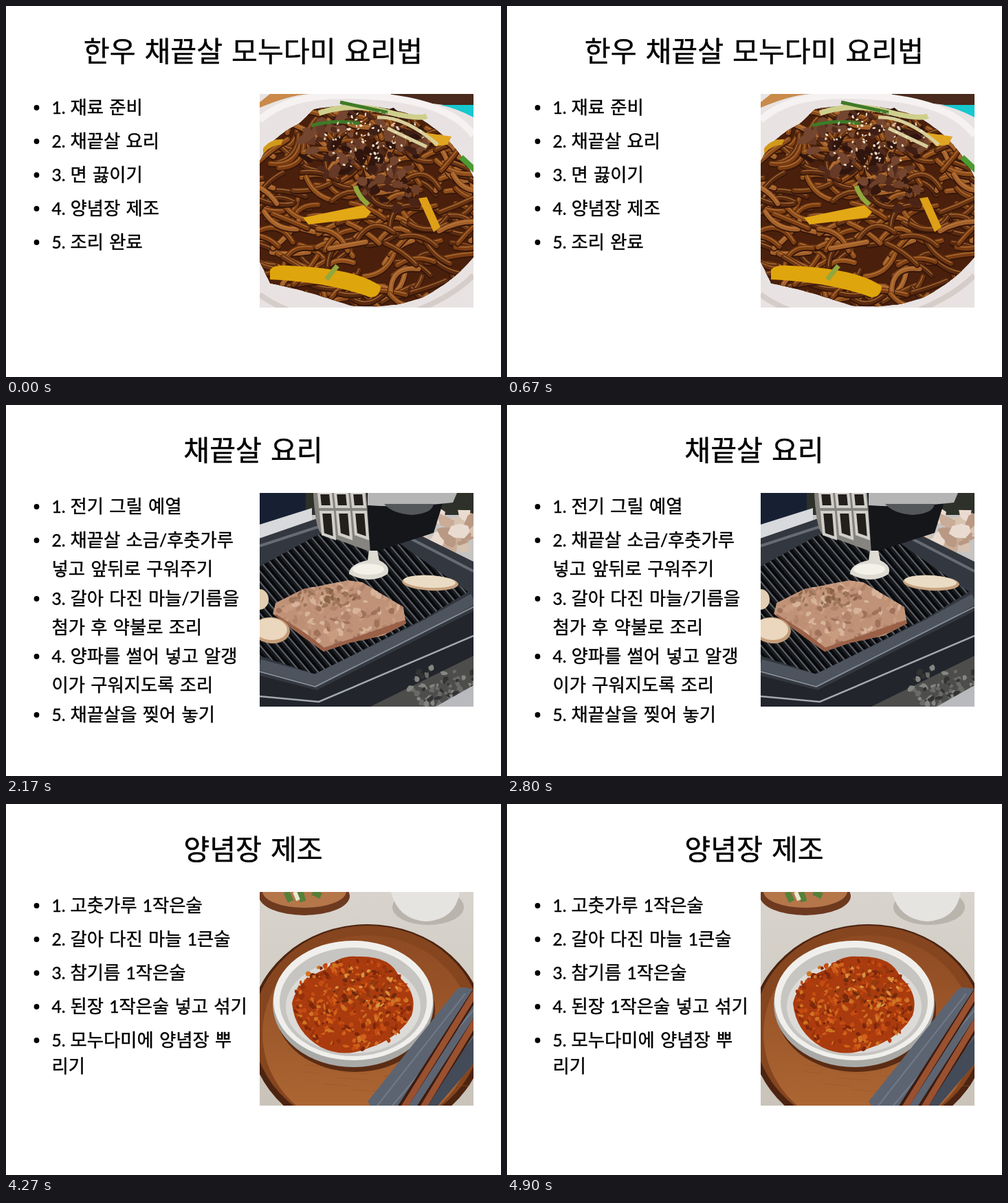
These frames come from a looping animation (720x540 px, 5320 ms). An HTML page:

```html
<!DOCTYPE html>
<html lang="ko">
<head>
<meta charset="utf-8">
<title>요리법</title>
<style>
html, body { margin: 0; width: 100%; height: 100%; overflow: hidden; background: #fff; }
#stage { display: block; width: 720px; height: 540px; }
text { font-family: "Noto Sans CJK KR", "Noto Sans CJK", sans-serif; fill: #000; stroke: #000; stroke-width: .45px; }
.latin { font-family: Lato, sans-serif; font-size: .93em; }
.title { font-size: 41.2px; word-spacing: 1.4px; text-anchor: middle; }
.slide { visibility: hidden; }
.slide.on { visibility: visible; }
</style>
</head>
<body>
<svg id="stage" viewBox="0 0 720 540" xmlns="http://www.w3.org/2000/svg"></svg>
<script>
let seed = 7;
const rnd = () => {
  seed = (seed * 16807) % 2147483647;
  return seed / 2147483647;
};
const span = (a, b) => a + (b - a) * rnd();
const pick = list => list[Math.floor(rnd() * list.length)];
const px = v => v.toFixed(1);

// Drawing helpers, all in stage coordinates
const fill = (d, color, more = '') => `<path d="${d}" fill="${color}" ${more}/>`;
const line = (d, color, w, more = '') =>
  `<path d="${d}" fill="none" stroke="${color}" stroke-width="${w}" ${more}/>`;
const oval = (x, y, rx, ry, color, turn = 0, more = '') =>
  `<ellipse cx="${x}" cy="${y}" rx="${rx}" ry="${ry}" fill="${color}" transform="rotate(${turn} ${x} ${y})" ${more}/>`;
const fade = (id, from, to, dir = 'x2="0" y2="1"') =>
  `<linearGradient id="${id}" ${dir}><stop stop-color="${from}"/><stop offset="1" stop-color="${to}"/></linearGradient>`;
const back = color => fill('M369 128h311v311h-311z', color);
const clip = (id, d, inner) =>
  `<clipPath id="${id}"><path d="${d}"/></clipPath><g clip-path="url(#${id})">${inner}</g>`;

// Repeats draw(x, y) at random points inside an ellipse
function scatter(n, cx, cy, rx, ry, draw) {
  let out = '';
  for (let i = 0; i < n; i++) {
    const a = span(0, 2 * Math.PI), r = Math.sqrt(rnd());
    out += draw(cx + rx * r * Math.cos(a), cy + ry * r * Math.sin(a));
  }
  return out;
}

// An irregular, slightly turned scrap
const crumb = (colors, min, max) => (x, y) => {
  const w = span(min, max), h = span(min, max * .7), turn = span(0, Math.PI), points = [];
  for (let i = 0; i < 7; i++) {
    const a = i * Math.PI / 3.5, r = span(.65, 1.2);
    const u = w * r * Math.cos(a), v = h * r * Math.sin(a);
    points.push(px(x + u * Math.cos(turn) - v * Math.sin(turn)) + ' ' + px(y + u * Math.sin(turn) + v * Math.cos(turn)));
  }
  return fill(`M${points.join('L')}Z`, pick(colors));
};

// A bent noodle, optionally with a dark edge and a thin shine
const strand = (colors, len, w, edge, shine) => (x, y) => {
  const a = span(-.9, .9), dx = len * Math.cos(a), dy = len * Math.sin(a), bend = span(-.6, .6);
  const curve = lift => `M${px(x - dx / 2)} ${px(y - dy / 2 - lift)}q${px(dx / 2 - dy * bend)} ${px(dy / 2 + dx * bend)} ${px(dx)} ${px(dy)}`;
  const round = 'stroke-linecap="round"';
  return (edge ? line(curve(-1), edge, w + 2, round) : '') +
    line(curve(0), pick(colors), w, round) +
    (shine ? line(curve(w / 5), shine, w / 5, round + ' opacity=".7"') : '');
};

function brownNoodles() {
  const heap = 'M369 226Q385 190 425 172L448 150Q530 135 600 162Q655 195 680 250V366Q650 402 606 424Q560 442 500 436Q430 412 384 404L369 372Z';
  return back('#e8e3e2') +
    fill('M384 128H440Q412 130 369 148V140Z', '#c98a4a') +
    fill('M560 128H680V148Q620 144 560 132Z', '#4a2a1c') +
    fill('M632 144H680V162Q655 149 632 144Z', '#17c8cf') +
    line('M369 166Q410 128 500 130Q640 132 680 188', '#f5f2f1', 10) +
    line('M369 420Q390 436 420 446M680 392Q650 422 600 442', '#d5cdc9', 8) +
    clip('heap', heap, fill(heap, '#4a200c') +
      scatter(230, 525, 300, 190, 150, strand(['#7c3d12', '#8f4d1a', '#5a2a10', '#a4602a', '#6a3412'], 54, 7, '#35160a', '#c08444'))) +
    scatter(100, 520, 205, 92, 54, crumb(['#3f1f15', '#522a1c', '#663a26', '#2f150e', '#744630'], 4, 14)) +
    scatter(26, 560, 275, 44, 26, crumb(['#4b2418', '#6e4029', '#351810'], 4, 12)) +
    fill('M384 384Q390 376 412 378Q510 382 545 408Q544 424 530 424Q470 402 384 398Z', '#dfa50c') +
    fill('M432 308L520 290L531 300L524 308L440 318Z', '#e3a815') +
    fill('M600 280L612 278L632 322L622 329Z', '#dda017') +
    fill('M606 184L648 190L642 202L624 204Z', '#e0a520') +
    fill('M374 207Q385 193 403 194L400 202Q386 202 374 215Z', '#d29a1a') +
    line('M455 156Q500 140 550 153T612 160', '#cfcf8c', 8) +
    line('M444 174Q480 165 514 171M486 140L555 155', '#3f7a28', 5) +
    line('M540 162Q580 160 628 202M555 178L612 205', '#d8cf9a', 5) +
    line('M508 262Q513 278 527 289M466 398L482 378', '#92a83c', 7) +
    line('M662 220L682 239', '#4a9b31', 8) +
    scatter(80, 535, 196, 74, 44, crumb(['#f0e2ce', '#d8c0a4'], 1, 3.2));
}

function liftedNoodles() {
  const column = 'M487 190Q510 160 558 163Q575 180 564 210L558 272Q530 292 492 302Q498 250 487 190Z';
  let hang = '';
  for (let x = 492; x < 564; x += 5)
    hang += line(`M${x} ${span(166, 190)}Q${x + span(-6, 8)} 230 ${x + span(-3, 3)} 305`, pick(['#f6dfbd', '#cda375', '#e9c797']), 2);
  return fade('wood', '#2a1812', '#3c241a') + back('url(#wood)') +
    scatter(60, 520, 180, 170, 50, (x, y) => line(`M${x} ${y}h${span(20, 70)}`, pick(['#4a2f23', '#1f110d']), 1.5)) +
    oval(528, 345, 184, 136, '#17181b', 8) + oval(528, 337, 180, 128, '#62666c', 8) +
    oval(529, 342, 172, 120, '#25272b', 8) +
    scatter(60, 525, 350, 160, 95, crumb(['#303238', '#191a1d'], 2, 5)) +
    oval(520, 337, 138, 83, '#c99d70', 6) +
    scatter(170, 520, 337, 122, 74, strand(['#f0d8b5', '#dbb686', '#cfa272', '#e9c9a0'], 40, 3.5, '#b08052')) +
    fill('M412 295L478 258L492 266L440 310Z', '#d9d2a4') +
    line('M414 297Q450 288 487 264', '#39702b', 7) +
    line('M424 318Q480 315 530 296M430 327L510 315', '#ead8ae', 9) +
    line('M568 258Q620 280 668 326M603 276Q642 320 632 375', '#d7b58b', 9) +
    clip('lift', column, fill(column, '#e2bd8c') + hang) +
    line('M544 190Q520 220 535 218Q560 210 558 185', '#f2d8b0', 5) +
    line('M672 124L534 193M636 124L546 180', '#8c8f94', 6) +
    line('M672 122L534 191M636 122L546 178', '#d6d8da', 2) +
    fill('M466 342L520 318L535 290L600 272L618 300L614 336L560 362L500 376L474 368Z', '#4f2f24') +
    scatter(80, 542, 336, 62, 28, crumb(['#6b4233', '#3b2119', '#7d5140', '#533126'], 3, 10)) +
    scatter(40, 590, 300, 22, 24, crumb(['#5d392b', '#432820'], 3, 9)) +
    fill('M508 364Q550 358 590 392Q596 406 576 405Q530 398 508 364Z', '#f1eee0') +
    fill('M530 362Q575 358 597 374Q575 384 530 362Z', '#e0d9c0') +
    fill('M520 404Q575 400 602 428Q560 428 520 404Z', '#e9e3d0') +
    fill('M590 398L641 401L636 426Q610 420 590 414Z', '#e8e4d8') +
    scatter(30, 555, 305, 28, 13, strand(['#8ba332', '#bcc257', '#5c741e'], 14, 4)) +
    scatter(36, 530, 288, 38, 15, strand(['#c71c18', '#e23c28', '#8e1010'], 26, 4)) +
    line('M490 305L520 268M515 268L572 272', '#c41d19', 5);
}

function grill() {
  let ribs = '', bars = '';
  for (let i = -14; i < 30; i++) {
    const x = 369 + i * 13;
    ribs += line(`M${x} 180l190 225`, '#5b5f66', 2.4) + line(`M${x + 4} 180l190 225`, '#08090b', 4);
  }
  for (let i = 0; i < 3; i++)
    bars += `<g transform="translate(${455 + i * 24} 128)">` +
      fill('M0 0H17L19 20H2ZM3 28H20L23 66L6 60Z', '#221f1d', 'stroke="#d0cfca" stroke-width="4"') + '</g>';
  const bed = 'M369 235L455 188L570 200L672 272L610 310L450 392L369 365Z';
  const steak = 'M388 304L392 288L432 268L498 255L518 258L578 294L582 318L548 336L500 346L462 359L430 336Z';
  return back('#c5c4c2') +
    fill('M369 128H436V168L369 178Z', '#172033') +
    fill('M436 128H680V160H436Z', '#2e3129') +
    fill('M369 174L445 150V176L369 198Z', '#d7d9dc') +
    scatter(34, 640, 180, 42, 30, crumb(['#d8c3b1', '#eadbd0', '#b99984', '#c9ac98'], 9, 21)) +
    fill('M369 194L450 166L575 176L680 228V350L500 439H369Z', '#33373f') +
    line('M369 205L452 178L580 190L680 242', '#666b74', 4) +
    clip('bed', bed, fill(bed, '#17191d') + ribs) +
    line('M369 378L450 400L612 320L680 282', '#4e545e', 16) +
    line('M369 388L450 410L680 294', '#868c95', 2) +
    fill('M369 394L452 415L680 300V370L545 439H369Z', '#22252b') +
    line('M369 424L455 432L680 336', '#a4a9af', 2.5) +
    fill('M530 439L680 365V439Z', '#4d4d4c') +
    scatter(90, 640, 410, 55, 32, crumb(['#6a6a68', '#323333', '#858582'], 2, 7)) +
    fill('M625 439L680 408V439Z', '#b8babd') +
    fill('M447 128H526L531 214L460 188Q450 184 447 128Z', '#86847f') + bars +
    fill('M524 128H640L622 186L530 216Z', '#15161a') +
    fill('M526 128H656L650 142Q580 150 526 146Z', '#b4b5b4') +
    fill('M550 144H622Q620 158 590 160Q562 158 550 144Z', '#55585a') +
    fill('M528 212H540L543 226Q560 234 555 246Q530 262 499 246Q498 232 526 226Z', '#dedbd3') +
    oval(527, 239, 23, 8, '#f4f1e9') +
    clip('steak', steak, fill(steak, '#c09378') +
      scatter(190, 488, 300, 92, 48, crumb(['#c99c80', '#b0836a', '#d7b39a', '#bd8f74', '#a0725a'], 2, 8)) +
      scatter(34, 460, 280, 50, 14, crumb(['#8a6346', '#9c7558'], 1.5, 6)) +
      line('M390 308L432 335L462 358L502 345L582 317', '#9a6048', 9, 'stroke-linejoin="round"')) +
    oval(617, 259, 41, 11, '#c7a27e', 3) + oval(616, 257, 38, 9, '#eadcc4', 3) +
    oval(386, 328, 27, 19, '#c49c78', 5) + oval(385, 326, 24, 16, '#ead7bd', 5) +
    oval(369, 283, 13, 15, '#e2ceb2');
}

function mixedBowl() {
  return fade('paper', '#fefefe', '#f0f1f1') + back('url(#paper)') +
    fade('metal', '#5e4a38', '#c9b8a4', '') +
    fill('M383 295L575 402L668 292L650 330L582 402Z', '#cfcccb') +
    fill('M379 287Q430 252 490 208L664 288L573 384Z', '#d9cabf') +
    fill('M379 287L573 384L664 288V296L574 392L382 295Z', '#a08d80') +
    line('M512 161L650 220M516 168L640 224', '#cfcfd0', 3) +
    oval(540, 320, 72, 14, '#9c897c', 5) +
    fill('M440 250Q441 328 530 329Q622 326 622 250Z', 'url(#metal)') +
    line('M462 304Q495 324 540 323Q590 318 608 296', '#efe6da', 3) +
    oval(531, 252, 91, 62, '#6d4d24') + oval(531, 253, 87, 59, '#c2862a') +
    oval(530, 258, 81, 53, '#d3a85e') +
    scatter(110, 488, 240, 42, 32, strand(['#e59a16', '#f0b632', '#cf7012', '#d74b18'], 16, 3.5)) +
    scatter(40, 530, 218, 40, 14, strand(['#a9a83c', '#c9c77a', '#7c8428'], 18, 4)) +
    fill('M552 228Q590 220 610 250Q618 270 605 276Q570 250 552 228Z', '#f2eee0') +
    line('M552 240Q590 255 606 282M562 232Q600 250 612 268', '#e2dcc6', 5) +
    scatter(80, 482, 286, 30, 22, crumb(['#2f261f', '#4a3b2c', '#1f1916'], 2, 8)) +
    scatter(40, 550, 290, 38, 18, strand(['#e9cd9a', '#d6a85e', '#f0dcb8'], 28, 4)) +
    scatter(25, 505, 250, 26, 18, crumb(['#c4301a', '#e06b22'], 2, 5)) +
    fill('M503 262L524 236L560 248L564 270L530 279Z', '#634334') +
    scatter(32, 534, 258, 25, 16, crumb(['#79513f', '#4b3025', '#8a6350'], 3, 9)) +
    line('M441 250Q444 191 531 190Q616 191 621 250Q618 312 531 314Q444 312 441 250', '#8a6a3c', 2.5) +
    line('M446 275Q466 312 531 312Q596 312 616 275', '#eadcc6', 2) +
    oval(654, 265, 25, 7, '#d2d0ce') +
    fill('M618 240Q620 268 650 267Q678 265 679 240Z', '#94867c') +
    line('M624 254Q650 270 674 252', '#d8cec6', 3) +
    oval(648, 239, 30, 19, '#5a4636') + oval(648, 240, 26, 15, '#a94a22') +
    scatter(44, 648, 241, 22, 12, crumb(['#c9401d', '#e2a56a', '#7e2713'], 1.5, 4)) +
    line('M416 336L562 402M406 341L551 415', '#4c4544', 4) +
    line('M416 335L562 400M406 340L551 413', '#b9b4b2', 1.4) +
    oval(396, 320, 28, 19, '#3a3a3d', 35) + oval(393, 318, 23, 15, '#7c7c80', 35) +
    oval(388, 312, 11, 6, '#dcdcdd', 35);
}

function redSauce() {
  return fade('cloth', '#d8d4cd', '#c9c3b9') + fade('tray', '#8e4a22', '#b06a36') + back('url(#cloth)') +
    oval(434, 134, 66, 28, '#6d3a20') + oval(434, 127, 61, 24, '#b5764a') +
    line('M408 128L414 142M428 128L432 142M446 128L458 134', '#55803a', 9) +
    line('M420 128L425 140', '#e6ead0', 6) +
    oval(614, 150, 52, 26, '#b9b4ac') + fill('M560 128H660Q654 168 611 171Q570 168 560 128Z', '#e6e4e0') +
    oval(526, 330, 172, 155, '#4c2411') + oval(526, 326, 166, 149, '#85451f') +
    oval(526, 334, 153, 143, 'url(#tray)') +
    scatter(50, 520, 350, 130, 90, (x, y) => line(`M${x} ${y}l${span(25, 60)} 3`, '#9a5528', 1, 'opacity=".6"')) +
    oval(508, 300, 116, 90, '#5b2c14') +
    oval(505, 291, 117, 92, '#a9aaa7') + oval(505, 286, 116, 87, '#f0efec') +
    oval(505, 288, 107, 79, '#c6c5c1') + oval(505, 295, 98, 68, '#dddbd7') +
    fill('M416 290Q424 255 466 240Q484 220 510 222Q560 220 572 252Q600 276 590 308Q570 342 525 356Q490 370 458 354Q420 332 416 290Z', '#a93b0e') +
    scatter(420, 503, 292, 86, 66, crumb(['#c44c12', '#96300b', '#d2601a', '#b23c0e', '#7c270b', '#cf7424'], 1.5, 6)) +
    scatter(60, 520, 266, 50, 34, crumb(['#6e2b0e', '#d99540', '#8d3a10'], 1.5, 5)) +
    fill('M526 433L654 272Q660 263 680 270V378L628 439H530Z', '#5c6472') +
    line('M540 439L668 276M562 439L680 300', '#737b88', 2) +
    fill('M600 439L680 340V378L628 439Z', '#434a58') +
    line('M572 448L684 274M600 448L690 308', '#3b1c10', 13) +
    line('M576 446L684 272M604 446L690 304', '#9a5130', 9);
}

const slides = [
  { ms: 1120, title: '한우 채끝살 모누다미 요리법', photo: brownNoodles, y: [157, 206, 255, 304, 353],
    lines: ['1. 재료 준비', '2. 채끝살 요리', '3. 면 끓이기', '4. 양념장 제조', '5. 조리 완료'] },
  { ms: 1050, title: '재료 준비', photo: liftedNoodles, y: [157, 206, 255, 304, 353],
    lines: ['1. 한우 채끝살 200g', '2. 모누리면 1개', '3. 보다미 1개', '4. 마늘 1큰술', '5. 양파 반개'] },
  { ms: 1050, title: '채끝살 요리', photo: grill, y: [157, 206, 248, 291, 333, 375, 417, 460],
    lines: ['1. 전기 그릴 예열', '2. 채끝살 소금/후춧가루', '넣고 앞뒤로 구워주기', '3. 갈아 다진 마늘/기름을',
      '첨가 후 약불로 조리', '4. 양파를 썰어 넣고 알갱', '이가 구워지도록 조리', '5. 채끝살을 찢어 놓기'] },
  { ms: 1050, title: '면 끓이기', photo: mixedBowl, scale: .85, y: [152, 188, 223, 257, 293, 326, 362, 396, 432, 465],
    lines: ['1. 더러운 물 버리고 청결한 물', '에 모누리면와 보다미 끓이기', '2. 면을 알맞게 익혔으면 면물', '대부분 소거',
      '3. 모누리면 양념, 보다미 양념', '넣기', '4. 칼집 난 채끝살과 함께 섞어', '직사각형 그릇에 담기',
      '5. 끓은 면 위에 채끝살 올려 마', '무리'] },
  { ms: 1050, title: '양념장 제조', photo: redSauce, y: [157, 206, 255, 304, 353, 391],
    lines: ['1. 고춧가루 1작은술', '2. 갈아 다진 마늘 1큰술', '3. 참기름 1작은술', '4. 된장 1작은술 넣고 섞기',
      '5. 모누다미에 양념장 뿌', '리기'] }
];

const latin = s => s.replace(/[\da-z.,\/]+/g, '<tspan class="latin">$&</tspan>');

function textLine(s, y, k) {
  const x = k < 1 ? 62.5 : 66.5;
  const [, number, words] = s.match(/^(\d\.)? ?(.*)$/);
  const put = (left, t) => `<text x="${left}" y="${y}" font-size="${26.35 * k}" word-spacing="${.9 * k}">${latin(t)}</text>`;
  return number
    ? oval(44.5, y - 9 * k, 3.9 * k, 3.9 * k, '#000') + put(x, number) + put(x + 27 * k, words)
    : put(x, words);
}

const stage = document.getElementById('stage');
stage.innerHTML = slides.map(s => `<g class="slide">
  <text class="title" x="359.5" y="81">${s.title}</text>
  ${s.lines.map((t, i) => textLine(t, s.y[i], s.scale || 1)).join('')}
  <svg x="369" y="128" width="311" height="311" viewBox="369 128 311 311">${s.photo()}</svg>
</g>`).join('');

const groups = [...stage.querySelectorAll('.slide')];
const loop = slides.reduce((sum, s) => sum + s.ms, 0);
const start = performance.now();

function show(now) {
  let t = Math.max(0, now - start) % loop, at = 0;
  while (t >= slides[at].ms) t -= slides[at++].ms;
  groups.forEach((g, i) => g.classList.toggle('on', i === at));
  requestAnimationFrame(show);
}
show(start);
</script>
</body>
</html>
```
